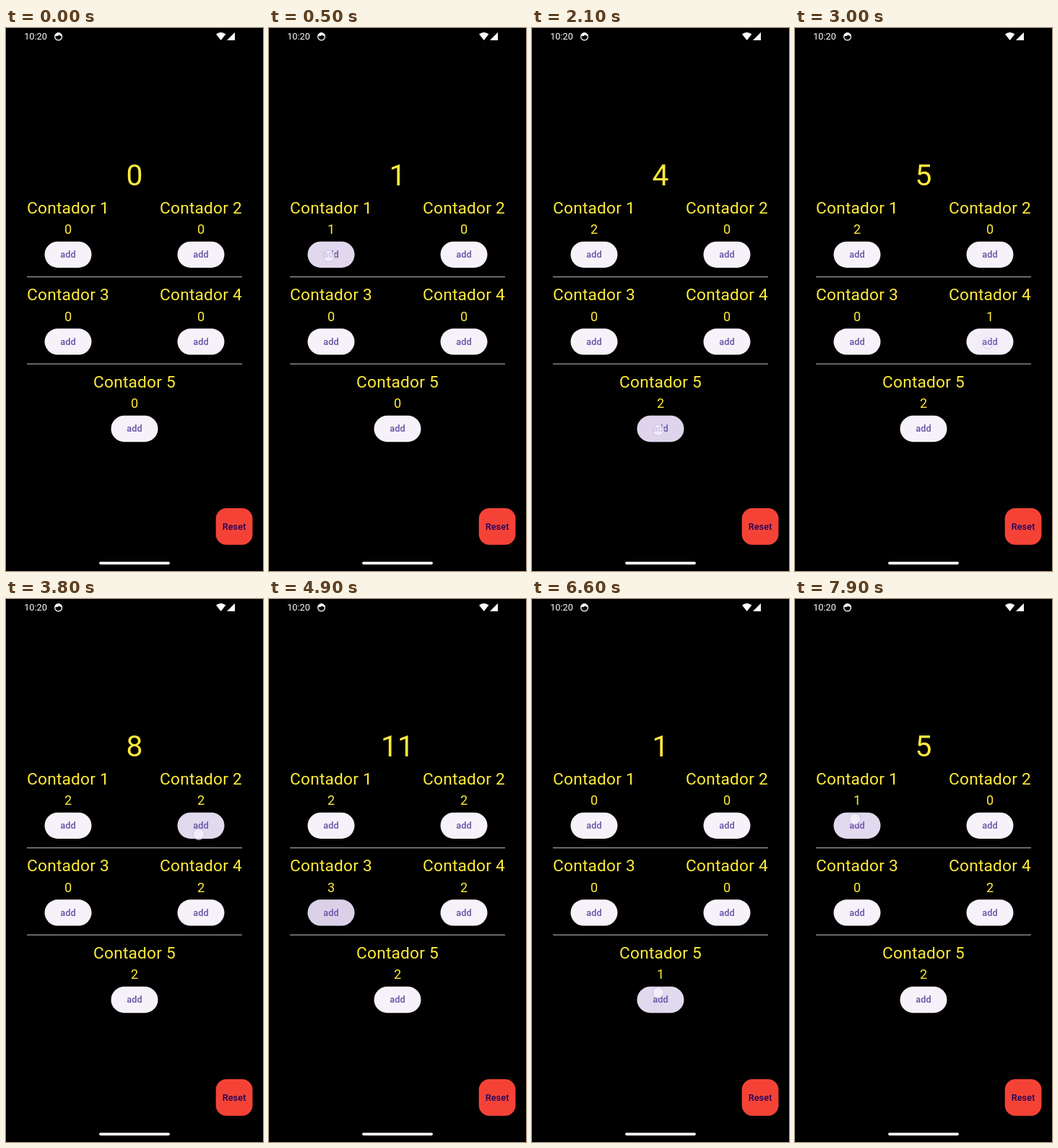
Animation, 356 px wide and 752 px high, one loop 8 s. Source, as an HTML page:

```html
<!DOCTYPE html>
<html lang="es">
<head>
<meta charset="utf-8">
<title>Contadores</title>
<style>
  html, body { margin: 0; width: 100%; height: 100%; overflow: hidden; background: #000; }
  svg { display: block; width: 356px; height: 752px; }
  text { font-family: Roboto, sans-serif; text-anchor: middle; fill: #ffeb3b; }
  .total { font-size: 40.8px; }
  .label { font-size: 22.66px; letter-spacing: .23px; }
  .count { font-size: 18.13px; }
  .add { font-size: 12.69px; font-weight: 500; letter-spacing: .09px; fill: #6750a4; }
  .add.dark { fill: #21005d; }
  .clock { font-size: 12.69px; text-anchor: start; fill: #fff; }
</style>
</head>
<body>
<svg id="stage" viewBox="0 0 356 752">
  <rect width="356" height="752" fill="#000"/>
  <text class="clock" x="25.2" y="16.4">10:20</text>
  <g fill="#fff">
    <circle cx="72.6" cy="12" r="4.9" fill="none" stroke="#fff" stroke-width="1.3"/>
    <path d="M67.6 11.2a5 5 0 0 1 10 0q-2.6 .2-4-1.8q-2 2.2-6 1.8z"/>
    <path d="M291 8.6Q297.7 3.6 304.4 8.6L297.7 17z"/>
    <path d="M317 6v11h-11z"/>
    <rect x="129" y="739.3" width="98" height="3.6" rx="1.8"/>
  </g>
  <path d="M29 344.7H327M29 465.2H327" stroke="#cac4d0"/>
</svg>
<script>
const LOOP = 8000, PRESS = 120, HOLD = 150, FADE = 250;
const COUNTERS = 5, RESET = COUNTERS, ROW = 120.6;
const stage = document.getElementById('stage');
const clamp = v => Math.max(0, Math.min(1, v));

function make(tag, attrs, parent = stage) {
  const el = document.createElementNS('http://www.w3.org/2000/svg', tag);
  set(el, attrs);
  parent.appendChild(el);
  return el;
}

function set(el, attrs) {
  for (const key in attrs) el.setAttribute(key, attrs[key]);
}

function write(cls, x, y, str) {
  const el = make('text', { class: cls, x, y });
  el.textContent = str;
  return el;
}

function button(id, cx, cy, width, height, rx, fill, ink, cls, str) {
  const box = { x: cx - width / 2, y: cy - height / 2, width, height, rx };
  make('rect', { ...box, fill });
  make('rect', box, make('clipPath', { id: 'clip' + id }));
  const tint = make('rect', { ...box, fill: ink, opacity: 0 });
  const layer = make('g', { 'clip-path': `url(#clip${id})` });
  const ripple = make('circle', { fill: ink, opacity: 0 }, layer);
  write(cls, cx, cy + 4.3, str);
  return { cx, cy, tint, ripple };
}

const total = write('total', 178, 218.3, '0');
const counts = [], buttons = [];
for (let i = 0; i < COUNTERS; i++) {
  const x = i === COUNTERS - 1 ? 178 : 86 + 184 * (i % 2);
  const dy = ROW * Math.floor(i / 2);
  write('label', x, 256.5 + dy, 'Contador ' + (i + 1));
  counts.push(write('count', x, 284.9 + dy, '0'));
  buttons.push(button(i, x, 313.8 + dy, 65, 36.3, 18.15, '#f7f2fa', '#6750a4', 'add', 'add'));
}
buttons.push(button(RESET, 316.1, 690.4, 50.8, 50.8, 14.5, '#f44336', '#21005d', 'add dark', 'Reset'));

// Runs of taps: n evenly spaced releases, the finger dy away from the button's centre.
const taps = [];
function run(id, first, n = 1, gap = 250, dy = 2) {
  for (let k = 0; k < n; k++) {
    taps.push({ id, up: first + k * gap, x: buttons[id].cx - 3, y: buttons[id].cy + dy });
  }
}
run(0, 480, 2, 470);
run(4, 1820, 2);
run(3, 2580, 2, 500);
run(1, 3540, 2, 250, 12);
run(2, 4370, 3, 190);
run(RESET, 5790);
run(4, 6590, 2, 250, -10);
run(3, 7240, 2);
run(0, 7890, 1, 0, -9);

const dot = make('g', { opacity: 0 });
const dotFill = make('circle', { r: 7.5, fill: '#f8f5ff' }, dot);
make('circle', { r: 7.7, fill: 'none', stroke: '#c5bfe8', opacity: .8 }, dot);

function draw(t) {
  const values = Array(COUNTERS).fill(0);
  const levels = buttons.map(() => 0);
  let touch = 0;

  for (const { id, up, x, y } of taps) {
    const age = t - up + PRESS;
    if (age < 0) break;
    if (t >= up) {
      if (id === RESET) values.fill(0);
      else values[id]++;
    }
    const fade = clamp(1 - (t - up - HOLD) / FADE);
    levels[id] = Math.max(levels[id], clamp((age - 20) / 160) * fade);
    set(buttons[id].ripple, { cx: x, cy: y, r: 8 + 62 * clamp(age / 270) });

    const seen = clamp(age / 50) * clamp(1 - (t - up - 95) / 40);
    if (seen > 0) {
      touch = seen;
      set(dot, { transform: `translate(${x} ${y})` });
      set(dotFill, { opacity: .7 * clamp((age - 30) / 80) });
    }
  }

  set(dot, { opacity: touch });
  counts.forEach((el, i) => { el.textContent = values[i]; });
  total.textContent = values.reduce((a, b) => a + b);
  buttons.forEach(({ tint, ripple }, i) => {
    set(tint, { opacity: .12 * levels[i] });
    set(ripple, { opacity: .1 * levels[i] });
  });
}

const start = performance.now();
function tick() {
  draw((performance.now() - start) % LOOP);
  requestAnimationFrame(tick);
}
tick();
</script>
</body>
</html>
```
